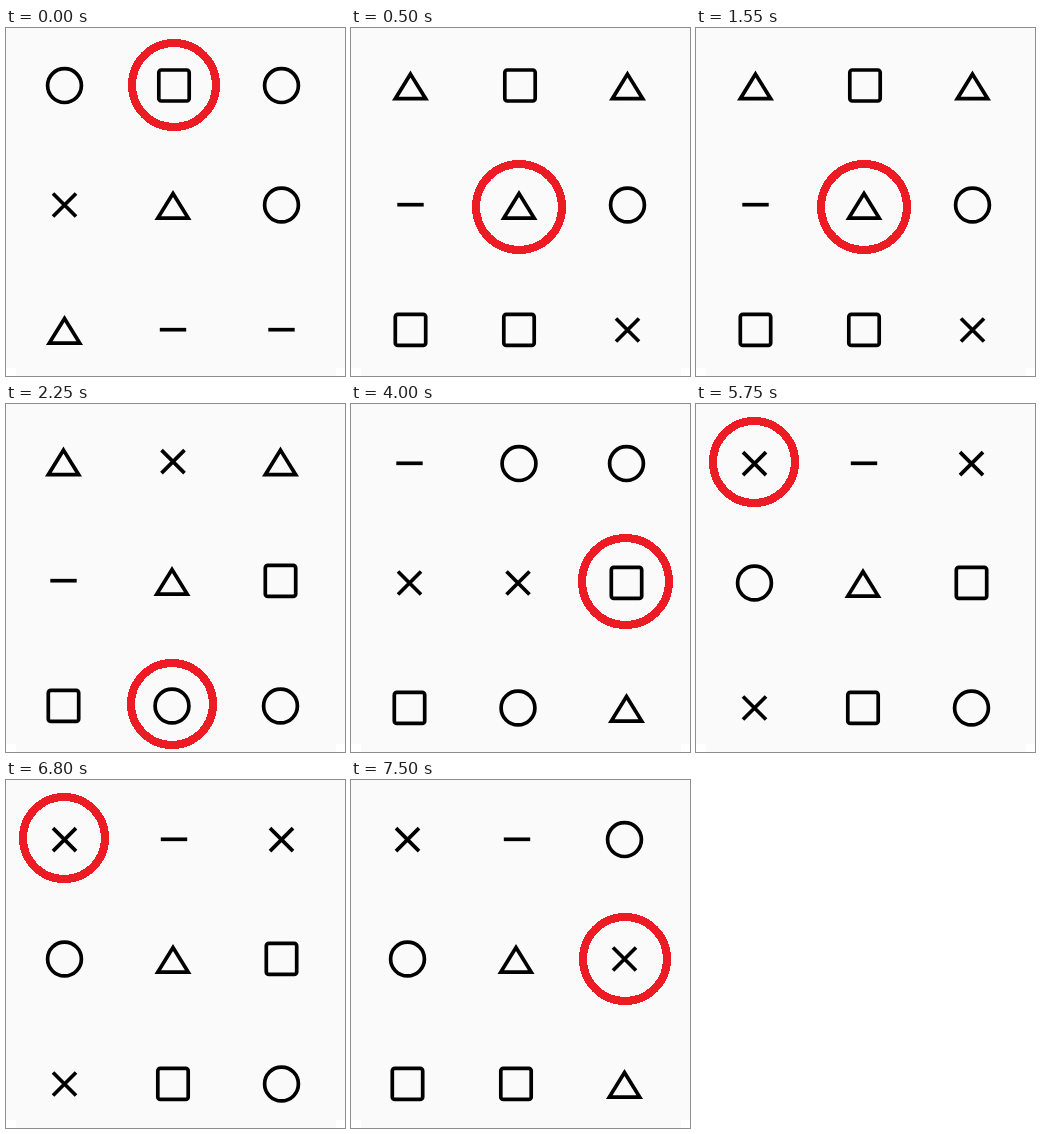
Write an HTML page that moves like this. It is 339 px wide and 348 px high and loops after 8 s.

```html
<!DOCTYPE html>
<html lang="en">
<head>
<meta charset="utf-8">
<title>Shape grid</title>
<style>
  html, body { margin: 0; width: 100%; height: 100%; overflow: hidden; background: #fafafa; }
  svg { display: block; }
  .marks { fill: none; stroke: #000; stroke-width: 3.7; filter: blur(.5px); }
  .ring { fill: none; stroke: #ed1c24; stroke-width: 8; shape-rendering: crispEdges; }
  #strip { animation: flip 8s step-end infinite; }
  @keyframes flip {
    0% { transform: translateX(0); }
    6.25% { transform: translateX(-339px); }
    28.125% { transform: translateX(-678px); }
    50% { transform: translateX(-1017px); }
    71.875% { transform: translateX(-1356px); }
    93.75%, 100% { transform: translateX(-1695px); }
  }
</style>
</head>
<body>
<svg width="339" height="348" viewBox="0 0 339 348">
  <path fill="#fff" d="M0 340H10V348H0ZM330 340H339V348H330Z"/>
  <g id="strip"></g>
</svg>
<script>
  const shapes = {
    o: '<circle r="16.9"/>',
    s: '<rect x="-15.2" y="-15.6" width="30.4" height="31" rx="2.5"/>',
    t: '<path d="M0-11.5L15.2 13.1H-15.2Z"/>',
    x: '<path d="M-11.5-11.5L11.5 11.5M11.5-11.5L-11.5 11.5"/>',
    d: '<path d="M-13.2-.3H13.2"/>'
  };
  const rows = [
    { y: 57.6, xs: [58.5, 168, 275.5] },
    { y: 177, xs: [58.5, 167, 275.5] },
    { y: 302, xs: [58.5, 167, 275.5] }
  ];

  // marks in reading order, grid offset, ring centre and outer radius
  const scenes = [
    { marks: 'osoxtotdd', dx: 0, dy: 0, ring: [168, 57, 46] },
    { marks: 'tstdtossx', dx: 1, dy: 0, ring: [168, 179, 47] },
    { marks: 'txtdtssoo', dx: -1, dy: 0, ring: [166, 300, 45] },
    { marks: 'dooxxssot', dx: 0, dy: 2, ring: [274.5, 177.5, 47.5] },
    { marks: 'xdxotsxso', dx: 0, dy: 2, ring: [58, 58, 45] },
    { marks: 'xdootxsst', dx: -2, dy: 2, ring: [274, 179, 46] }
  ];

  const drawScene = ({ marks, dx, dy, ring: [cx, cy, r] }, n) => {
    const cells = [...marks].map((m, i) => {
      const { y, xs } = rows[Math.floor(i / 3)];
      return `<g transform="translate(${xs[i % 3] + dx} ${y + dy})">${shapes[m]}</g>`;
    }).join('');
    return `<g transform="translate(${n * 339} 0)"><g class="marks">${cells}</g>` +
      `<circle class="ring" cx="${cx}" cy="${cy}" r="${r - 4}"/></g>`;
  };

  document.getElementById('strip').innerHTML = scenes.map(drawScene).join('');
</script>
</body>
</html>
```
